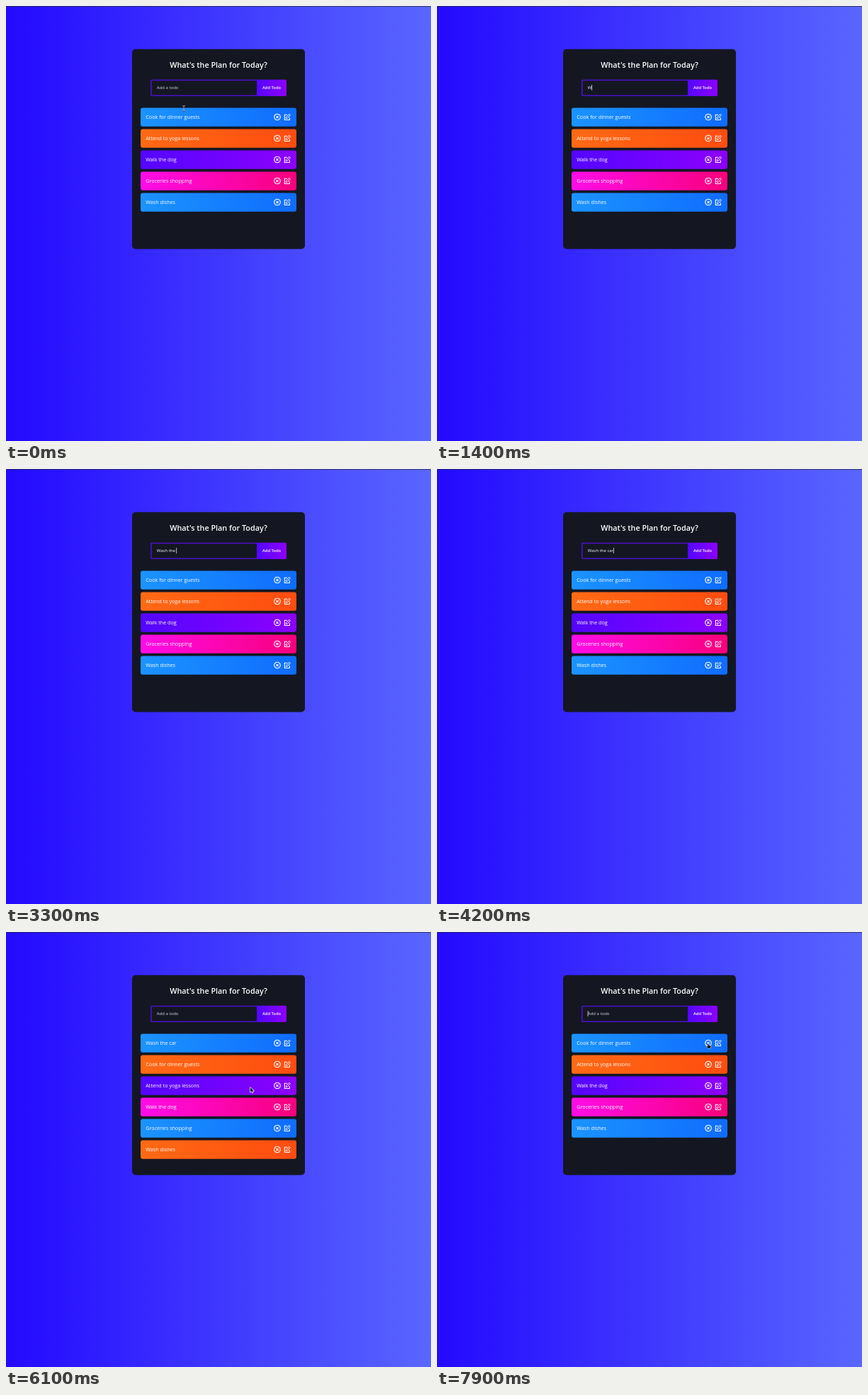
An HTML page with a canvas for the animation above (8000 ms loop, 600x613 px).

```html
<!DOCTYPE html>
<html lang="en">
<head>
<meta charset="utf-8">
<title>Todo list</title>
<style>
  html, body { margin: 0; width: 100%; height: 100%; overflow: hidden; background: #3a35ff; }
  canvas { display: block; }
</style>
</head>
<body>
<canvas id="stage" width="600" height="613"></canvas>
<script>
const ctx = document.getElementById('stage').getContext('2d');
const LOOP = 8000, STEP = 100;
const FONT = '"Trebuchet MS", "Open Sans", sans-serif';
const TASKS = ['Cook for dinner guests', 'Attend to yoga lessons', 'Walk the dog', 'Groceries shopping', 'Wash dishes'];
const NEW_TASK = 'Wash the car';
const KEYS = [1400, 1500, 1600, 1700, 2500, 2700, 2900, 3000, 3200, 3800, 4000, 4200];
const CLICK = 500, ENTER = 5400, REMOVE = 7800;
const PURPLE = ['#5406ff', '#8c00fc'];
const ROW_COLORS = [['#1b94ff', '#0f6cff'], ['#ff6a14', '#ff4c10'], PURPLE, ['#ff0ce8', '#f8007c']];

// Pointer stops: time, x, y
const PATH = [[0, 251, 144], [300, 251, 144], [500, 252, 112], [5700, 252, 112],
  [6100, 345, 219], [6300, 345, 219], [6900, 382, 157], [LOOP, 382, 157]];

function across(x, w, [from, to]) {
  const g = ctx.createLinearGradient(x, 0, x + w, 0);
  g.addColorStop(0, from);
  g.addColorStop(1, to);
  return g;
}

function box(x, y, w, h, r, fill) {
  ctx.fillStyle = fill;
  ctx.beginPath();
  ctx.roundRect(x, y, w, h, r);
  ctx.fill();
}

function text(str, x, y, size, weight = 500, color = '#fff', align = 'left') {
  ctx.font = `${weight} ${size}px ${FONT}`;
  ctx.textAlign = align;
  ctx.fillStyle = color;
  ctx.fillText(str, x, y);
}

function stroke(d, color, width) {
  ctx.strokeStyle = color;
  ctx.lineWidth = width;
  ctx.stroke(new Path2D(d));
}

function at(x, y, draw) {
  ctx.save();
  ctx.translate(x, y);
  draw();
  ctx.restore();
}

function icons(y) {
  at(383, y, () => {
    ctx.beginPath();
    ctx.arc(0, 0, 4.3, 0, 7);
    ctx.strokeStyle = '#fff';
    ctx.lineWidth = 1.1;
    ctx.stroke();
    stroke('M-1.6-1.6 1.6 1.6M1.6-1.6-1.6 1.6', '#fff', 1.1);
  });
  at(397, y, () => {
    stroke('M0-3.3H-3.7V4H3.3V.7', '#fff', 1.1);
    stroke('M-1.6 2V.3L3-4.2 4.4-2.8-.1 2Z', '#fff', 1);
  });
}

function row(label, i) {
  const y = 143.5 + 30 * i;
  box(190, y, 220, 26.3, 3, across(190, 220, ROW_COLORS[i % 4]));
  text(label, 197.3, y + 15.7, 7.2);
  icons(y + 13);
}

function suggestions() {
  box(204, 126.5, 151, 74.5, 1, '#25262c');
  ['elma', 'apple', 'kiraz', 'ev'].forEach((s, i) => text(s, 209.7, 141.7 + 17 * i, 6.6));
}

function pointerAt(t) {
  const i = PATH.findIndex(p => p[0] > t);
  const [t0, x0, y0] = PATH[i - 1], [t1, x1, y1] = PATH[i];
  const u = (t - t0) / (t1 - t0), k = u * u * (3 - 2 * u);
  return [x0 + (x1 - x0) * k, y0 + (y1 - y0) * k];
}

function pointer(t) {
  if (t >= KEYS[0] && t < 5700) return;
  const [x, y] = pointerAt(t);
  at(x, y, () => {
    ctx.lineJoin = 'round';
    if (t < ENTER) {
      const beam = 'M-2-3.7Q0-3.7 0-2.5Q0-3.7 2-3.7M0-2.7V2.7M-2 3.7Q0 3.7 0 2.5Q0 3.7 2 3.7M-1 1H1';
      stroke(beam, 'rgba(0,0,0,.5)', 1.6);
      stroke(beam, '#bbb', .8);
      return;
    }
    const onIcon = Math.hypot(x - 383, y - 156.5) < 5;
    const shape = onIcon
      ? 'M-.5.5Q.3 0 .7.8L1.4 2.6 4 3.2Q5 3.6 4.6 5L4 7H1L-1.6 4.6Q-1.6 3.7-.6 4L.3 4.4Z'
      : 'M0 0V6.6L1.5 5.2 2.6 7.6 3.7 7.1 2.7 4.8H4.8Z';
    stroke(shape, '#fff', onIcon ? 1 : 1.3);
    ctx.fillStyle = '#111';
    ctx.fill(new Path2D(shape));
  });
}

function field(t) {
  const typed = t < ENTER ? NEW_TASK.slice(0, KEYS.filter(k => k <= t).length) : '';
  box(204, 103.7, 151, 23.3, [2, 0, 0, 2], '#4a12c8');
  box(205.6, 105.3, 149, 20.1, [1, 0, 0, 1], '#141722');
  box(354, 103.7, 42, 23.3, [0, 2, 2, 0], across(354, 42, PURPLE));
  text('Add Todo', 375, 117.4, 5.8, 600, '#fff', 'center');
  text(typed || 'Add a todo', 212.8, 117.4, 6, 500, typed ? '#fff' : '#dcdce2');

  // The caret restarts its blink at each input
  const last = [300, CLICK, ...KEYS, ENTER, REMOVE].filter(k => k <= t).pop();
  if (last !== undefined && (t - last) % 1000 < 500) {
    ctx.font = `500 6px ${FONT}`;
    ctx.fillStyle = '#ddd';
    ctx.fillRect(212.7 + ctx.measureText(typed).width, 111, .8, 8);
  }
}

function draw(t) {
  ctx.fillStyle = across(0, 600, ['#2409ff', '#5966ff']);
  ctx.fillRect(0, 0, 600, 613);
  ctx.fillStyle = 'rgba(40,40,60,.7)';
  ctx.fillRect(0, 0, 600, 1);
  box(178, 60.7, 244, 281.8, 5, '#141722');
  text("What's the Plan for Today?", 300, 86.7, 10.8, 600, '#fff', 'center');
  field(t);
  const added = t >= ENTER && t < REMOVE;
  (added ? [NEW_TASK, ...TASKS] : TASKS).forEach(row);
  if (t >= CLICK && t < KEYS[0]) suggestions();
  pointer(t);
}

const start = performance.now();
function tick() {
  const t = (performance.now() - start) % LOOP;
  draw(Math.floor(t / STEP) * STEP);
  requestAnimationFrame(tick);
}
tick();
</script>
</body>
</html>
```
